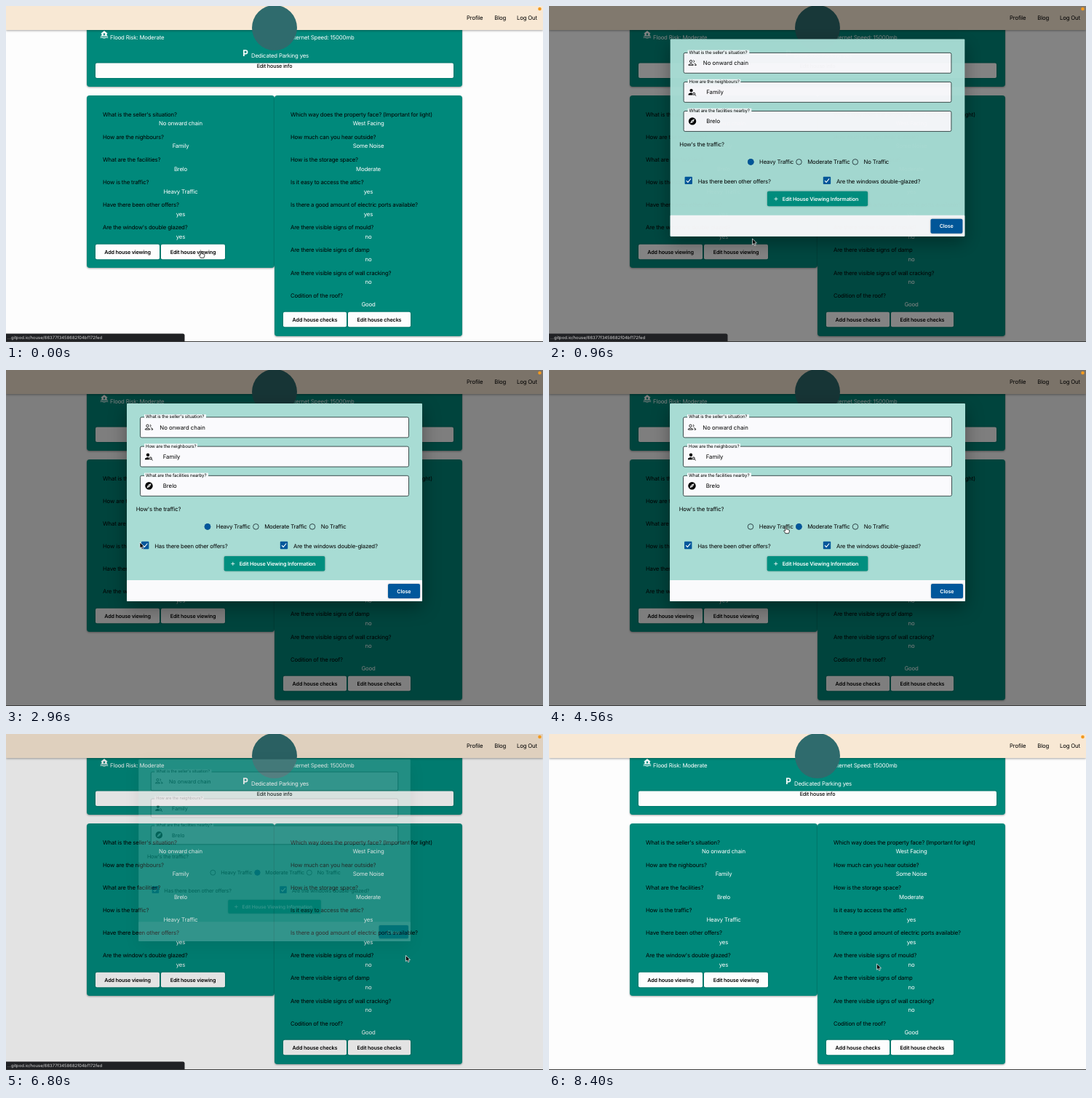
Write an HTML page that moves like this. It is 738 px wide and 462 px high and loops after 8.48 s.

```html
<!DOCTYPE html>
<html lang="en">
<head>
<meta charset="utf-8">
<title>House viewing form</title>
<style>
  html, body { margin: 0; width: 100%; height: 100%; overflow: hidden; background: #fdfdfd; }
  svg { display: block; width: 738px; height: 462px; }
  text { font: 7.8px Inter, "Noto Sans", sans-serif; letter-spacing: -.18px; text-rendering: geometricPrecision; }
  .mid { text-anchor: middle; }
  .end { text-anchor: end; }
  .white { fill: #fff; }
  .btn { font-size: 7.2px; font-weight: 600; letter-spacing: -.15px; text-anchor: middle; }
  .info { font-size: 7.2px; font-weight: 500; letter-spacing: -.15px; text-anchor: middle; }
  .label { font-size: 6.15px; letter-spacing: -.14px; }
  .field { letter-spacing: 0; }
  .link { font-size: 5.9px; letter-spacing: 0; fill: #d6d6d6; }
  .card { fill: #00897b; filter: drop-shadow(0 1px 1px rgba(0,0,0,.35)); }
  .soft { filter: drop-shadow(0 .8px .9px rgba(0,0,0,.3)); }
</style>
</head>
<body>
<svg viewBox="0 0 738 462" xmlns="http://www.w3.org/2000/svg">
  <rect width="738" height="462" fill="#fdfdfd"/>
  <g id="page"></g>
  <rect id="shade" width="738" height="462" opacity="0"/>
  <g id="modal" opacity="0"></g>
  <g id="status">
    <path d="M0 450.5H243Q245.500 450.500 245.500 453V462H0Z" fill="#202124"/>
    <text class="link" x="2" y="458.300">...gitpod.io/house/66377f3458682f04bf172fed</text>
  </g>
  <rect y="461" width="738" height="1" fill="#3c3c3c"/>
  <circle cx="733.500" cy="4" r="2.300" fill="#f39a1f"/>
  <g id="cursor">
    <path id="arrow" d="M0 0V8.200L1.900 6.500L3.200 9.300L4.700 8.600L3.400 5.900H6Z" fill="#000" stroke="#fff" stroke-width=".7"/>
    <path id="hand" d="M-.8 .6Q0-.4 .8 .6V3.600Q1.700 3 2.300 3.900Q3.200 3.300 3.700 4.200Q4.800 4 4.900 5.200Q5 7.200 3.900 9.200H-.6Q-1.400 7.300-2.900 5.700Q-2.600 4.400-.8 5.700Z" fill="#fff" stroke="#000" stroke-width=".75"/>
  </g>
</svg>
<script>
const LOOP = 8480, STEP = 80;
const OPEN = 755, CLOSE = 6662, FADE = 250;
const BLUE = '#01579b';
const $ = id => document.getElementById(id);

const rect = (x, y, w, h, fill, r = 0, cls = '') =>
  `<rect x="${x}" y="${y}" width="${w}" height="${h}" rx="${r}" fill="${fill}" class="${cls}"/>`;
const text = (x, y, s, cls = '') => `<text x="${x}" y="${y}" class="${cls}">${s}</text>`;
const shape = (d, attrs = '') => `<path d="${d}" ${attrs}/>`;
const button = (x, y, w, s) =>
  rect(x, y, w, 20.5, '#fdfdfd', 2, 'soft') + text(x + w / 2, y + 12.8, s, 'btn');

function answers(x, mid, rows) {
  return rows.map(([q, a], i) => {
    const y = 151.7 + i * 31.13;
    return text(x, y, q) + text(mid, y + 12.6, a, 'mid white');
  }).join('');
}

function pageMarkup() {
  const floodIcon = `<g transform="translate(129.800 34)" fill="#fff">` +
    shape('M5.200 0L10 4H8.800V7H1.600V4H.4Z') + rect(4, 3.6, 2.4, 2.4, '#00897b') +
    shape('M0 8Q1.700 6.800 3.400 8T6.800 8T10.400 8M0 9.800Q1.700 8.600 3.400 9.800T6.800 9.800T10.400 9.800',
      'fill="none" stroke="#fff" stroke-width=".9"') + '</g>';
  const parkIcon = shape('M326.900 69V61H329.200A2.200 2.200 0 0 1 329.200 65.700H327',
    'fill="none" stroke="#fff" stroke-width="1.700"');
  return rect(111, 10, 516, 101, '', 4, 'card') +
    floodIcon + text(143, 45.5, 'Flood Risk: Moderate', 'white') +
    text(478.5, 45.5, 'Internet Speed: 15000mb', 'white end') +
    parkIcon + text(337, 70.8, 'Dedicated Parking yes', 'white') +
    rect(123, 78.5, 492, 20.5, '#fdfdfd', 2, 'soft') + text(369, 85.1, 'Edit house info', 'info') +
    rect(111, 123, 258, 237, '', 4, 'card') + rect(369, 123, 258, 331, '', 4, 'card') +
    answers(133, 240, [
      ["What is the seller's situation?", 'No onward chain'],
      ['How are the nighbours?', 'Family'],
      ['What are the facilities?', 'Brelo'],
      ['How is the traffic?', 'Heavy Traffic'],
      ['Have there been other offers?', 'yes'],
      ["Are the window's double glazed?", 'yes']
    ]) +
    answers(391, 498, [
      ['Which way does the property face? (Important for light)', 'West Facing'],
      ['How much can you hear outside?', 'Some Noise'],
      ['How is the storage space?', 'Moderate'],
      ['Is it easy to access the attic?', 'yes'],
      ['Is there a good amount of electric ports available?', 'yes'],
      ['Are there visible signs of mould?', 'no'],
      ['Are there visible signs of damp', 'no'],
      ['Are there visible signs of wall cracking?', 'no'],
      ['Codition of the roof?', 'Good']
    ]) +
    button(123, 327.7, 88, 'Add house viewing') + button(213, 327.7, 88, 'Edit house viewing') +
    button(381, 420.7, 87, 'Add house checks') + button(470, 420.7, 86, 'Edit house checks') +
    `<rect width="738" height="33" fill="#f8e8d4" style="filter:drop-shadow(0 1px 1.500px rgba(0,0,0,.35))"/>` +
    text(633, 19.2, 'Profile') + text(671.3, 19.2, 'Blog') + text(702, 19.2, 'Log Out') +
    `<circle cx="369" cy="30" r="31" fill="#2f6b6d"/>`;
}

function fieldMarkup(i, label, labelWidth, x, value) {
  const y = 64.9 + i * 40.2;
  return `<rect x="184.500" y="${y}" width="369" height="28" rx="2" fill="#fafafd" stroke="#2b3b3b" stroke-width=".9"/>` +
    rect(190, y - 3.8, labelWidth, 6.6, '#f4f9fa') + text(192, y + 1.4, label, 'label') +
    text(x, y + 16.9, value, 'field');
}

const radioX = [277, 343.4, 421];

function modalMarkup() {
  const people = `<g fill="none" stroke="#111" stroke-width=".9"><circle cx="194.500" cy="76.700" r="1.700"/>` +
    shape('M191.300 82V81.200Q194.500 78.600 197.700 81.200V82Z') +
    shape('M197.900 75.100A1.700 1.700 0 0 1 197.900 78.300M199.200 79.600Q201.800 80.200 201.800 82H199.500') + '</g>';
  const search = `<circle cx="195" cy="116.800" r="2.200"/>` +
    shape('M191 123.200V121.800Q193 119.400 196 120Q195.800 121.800 197.200 123.200Z') +
    `<g fill="none" stroke="#000"><circle cx="198.700" cy="121.400" r="1.500"/>${shape('M199.800 122.500L201.600 124.200')}</g>`;
  const compass = `<circle cx="196.500" cy="159.200" r="5.200"/>` +
    shape('M199.600 156.100L197.700 160.400L193.400 162.300L195.300 158Z', 'fill="#fff"') +
    `<circle cx="196.500" cy="159.200" r=".7"/>`;
  const radios = ['Heavy Traffic', 'Moderate Traffic', 'No Traffic'].map((s, i) =>
    `<circle cx="${radioX[i]}" cy="215.400" r="3.800" fill="none" stroke="#31474b"/>` +
    `<circle id="dot${i}" cx="${radioX[i]}" cy="215.400" r="4.300" fill="${BLUE}"/>` +
    text(radioX[i] + 11.8, 218.3, s)).join('');
  const check = (x, s) => rect(x - 5.2, 235.8, 10.4, 10.4, BLUE, 1) +
    shape(`M${x - 3} 241.200L${x - .9} 243.400L${x + 3.2} 238.500`, 'fill="none" stroke="#fff" stroke-width="1.100"') +
    text(x + 13, 244.8, s);
  return `<rect x="166" y="46" width="406" height="272" rx="1" fill="#a8dcd4" style="filter:drop-shadow(0 8px 12px rgba(0,0,0,.35))"/>` +
    rect(166, 289, 406, 29, '#fafafc', 1) +
    fieldMarkup(0, "What is the seller's situation?", 85, 211.3, 'No onward chain') +
    fieldMarkup(1, 'How are the neighbours?', 73, 215.7, 'Family') +
    fieldMarkup(2, 'What are the facilities nearby?', 88, 215.7, 'Brelo') +
    people + search + compass +
    text(178.7, 194, "How's the traffic?") + radios +
    check(191.2, 'Has there been other offers?') + check(382, 'Are the windows double-glazed?') +
    rect(299.7, 256, 138.6, 20.5, '#008f7f', 2, 'soft') +
    shape('M309.300 266.400H314.300M311.800 263.900V268.900', 'stroke="#fff" stroke-width=".8"') +
    text(373, 268.9, 'Edit House Viewing Information', 'btn white') +
    `<rect id="close" x="525" y="294" width="44" height="20" rx="2" class="soft"/>` +
    text(546.8, 306.7, 'Close', 'btn white');
}

$('page').innerHTML = pageMarkup();
$('modal').innerHTML = modalMarkup();

const clamp = v => Math.max(0, Math.min(1, v));
const ramp = (t, start, span) => clamp((t - start) / span);
const outQuad = v => 1 - (1 - v) ** 2;
const smooth = v => v * v * (3 - 2 * v);
const within = (t, spans) => spans.some(([a, b]) => t >= a && t < b);

// time, x, y of the pointer tip
const path = [
  [0, 268, 337], [720, 268, 337], [960, 279.5, 320], [1900, 235, 268],
  [2640, 186, 239], [2960, 184, 237], [3760, 341, 213], [4160, 341, 213],
  [4560, 325.5, 215.5], [5200, 366, 262], [5600, 392, 268], [6320, 549.5, 304.5],
  [7040, 549.5, 304.5], [7900, 453, 315], [8400, 450.5, 316]
];
const handTimes = [[0, 880], [3520, 4720], [5120, 5760], [6160, 6720]];

function pointer(t) {
  const i = path.findIndex(p => p[0] > t);
  if (i < 0) return path[path.length - 1].slice(1);
  const [t0, x0, y0] = path[i - 1], [t1, x1, y1] = path[i];
  const k = smooth((t - t0) / (t1 - t0));
  return [x0 + (x1 - x0) * k, y0 + (y1 - y0) * k];
}

function mixColor(a, b, k) {
  return `rgb(${a.map((v, i) => Math.round(v + (b[i] - v) * k))})`;
}

function draw(t) {
  const shown = outQuad(ramp(t, OPEN, FADE)) - outQuad(ramp(t, CLOSE, FADE));
  const scale = .9 + .1 * shown;
  $('shade').setAttribute('opacity', .5 * shown);
  $('modal').setAttribute('opacity', shown);
  $('modal').setAttribute('transform',
    `translate(369 ${182 - 27.7 * (1 - shown)}) scale(${scale}) translate(-369 -182)`);

  const picked = smooth(ramp(t, 3920, 280));
  [1 - picked, picked, 0].forEach((k, i) => $('dot' + i).setAttribute('r', 4.3 * k));

  const hover = ramp(t, 6200, 240) * (t < 6720 ? 1 : 0);
  $('close').setAttribute('fill', mixColor([1, 87, 155], [124, 193, 245], hover));

  const link = t < 4000 ? 1 - ramp(t, 1040, 240) : ramp(t, 6320, 160) - ramp(t, 7120, 240);
  $('status').setAttribute('opacity', link);

  const [x, y] = pointer(t), hand = within(t, handTimes);
  $('cursor').setAttribute('transform', `translate(${x} ${y})`);
  $('hand').style.display = hand ? '' : 'none';
  $('arrow').style.display = hand ? 'none' : '';
}

const start = performance.now();
function tick() {
  const t = (performance.now() - start) % LOOP;
  draw(Math.floor(t / STEP) * STEP);
  requestAnimationFrame(tick);
}
draw(0);
requestAnimationFrame(tick);
</script>
</body>
</html>
```
